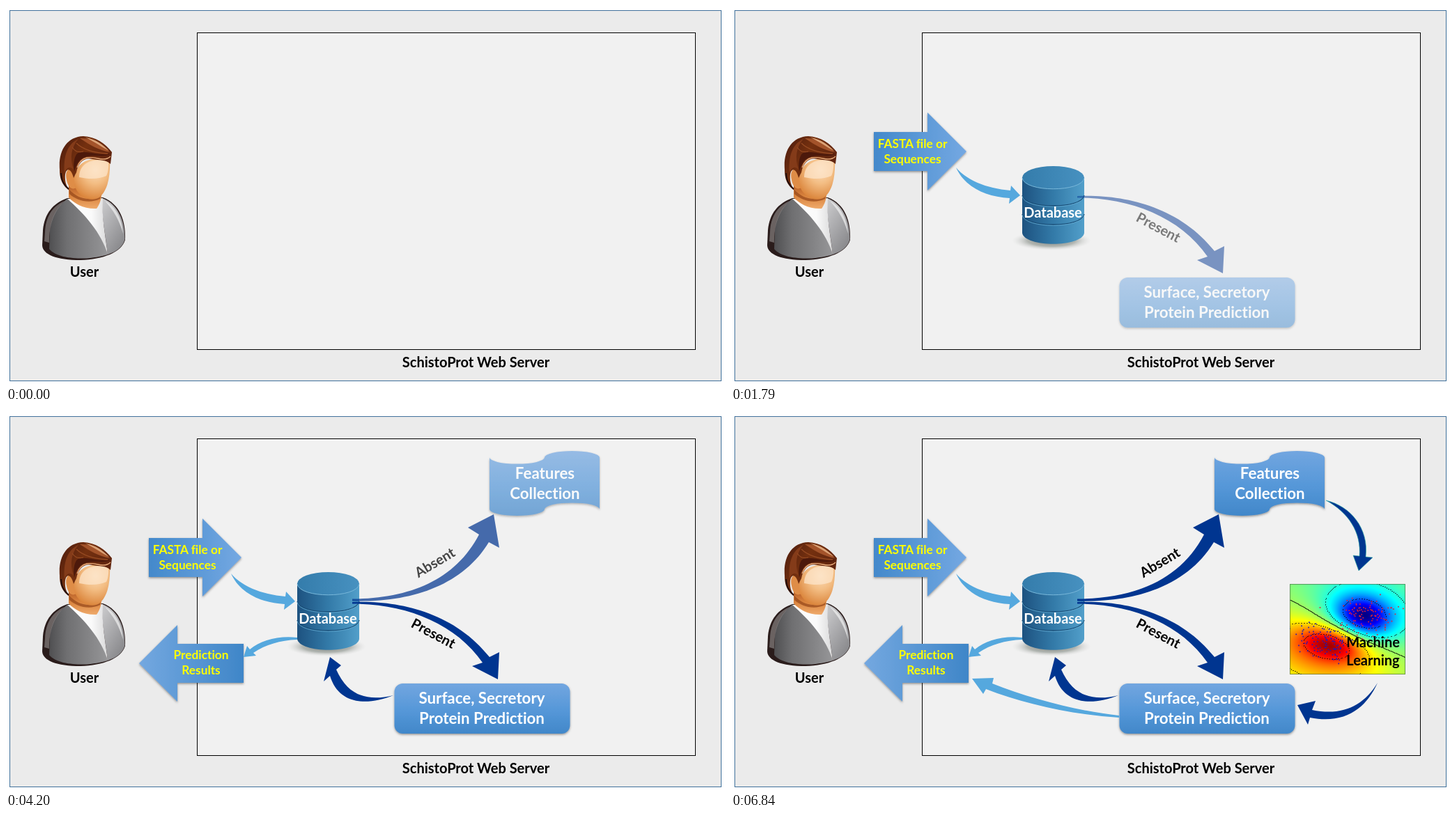
Write an HTML page with a canvas that moves like this. It is 1032 px wide and 543 px high and loops after 7.14 s.

```html
<!DOCTYPE html>
<html lang="en">
<head>
<meta charset="utf-8">
<title>Web server workflow</title>
<style>
html, body { margin: 0; width: 100%; height: 100%; overflow: hidden; background: #fff; }
svg, canvas, #ml { position: absolute; left: 0; top: 0; display: block; }
#ml { left: 802px; top: 247px; width: 166px; height: 130px; }
text { font-family: Lato, Carlito, Calibri, sans-serif; font-weight: 700; font-size: 20px; text-anchor: middle; font-variant-ligatures: none; }
.step { opacity: 0; }
.navy { fill: #003590; }
.sky { fill: #55a8de; }
.yellow { fill: #ff0; font-size: 17.3px; }
.white { fill: #fff; }
.big { font-size: 22.3px; }
</style>
</head>
<body>
<svg width="1032" height="543" viewBox="0 0 1032 543">
  <defs>
    <linearGradient id="right"><stop stop-color="#4389cb"/><stop offset="1" stop-color="#74a8e2"/></linearGradient>
    <linearGradient id="left"><stop stop-color="#74a8e0"/><stop offset="1" stop-color="#3f86c8"/></linearGradient>
    <linearGradient id="down" x2="0" y2="1"><stop stop-color="#72a6e0"/><stop offset=".55" stop-color="#5597d8"/><stop offset="1" stop-color="#4187c9"/></linearGradient>
    <linearGradient id="drum"><stop stop-color="#1d5280"/><stop offset=".5" stop-color="#337aa8"/><stop offset="1" stop-color="#529fca"/></linearGradient>
    <linearGradient id="lid"><stop stop-color="#347cab"/><stop offset="1" stop-color="#4791c0"/></linearGradient>
    <linearGradient id="coat"><stop stop-color="#4f4f51"/><stop offset=".3" stop-color="#6f6f71"/><stop offset="1" stop-color="#969698"/></linearGradient>
    <linearGradient id="coat2" x2=".6" y2="1"><stop stop-color="#cdcdcf"/><stop offset="1" stop-color="#8a8a8d"/></linearGradient>
    <linearGradient id="shirt"><stop stop-color="#fff"/><stop offset=".6" stop-color="#fafafa"/><stop offset="1" stop-color="#d9d9da"/></linearGradient>
    <linearGradient id="hair" x2="1" y2=".6"><stop stop-color="#4a1a0d"/><stop offset=".45" stop-color="#74300f"/><stop offset="1" stop-color="#5b220f"/></linearGradient>
    <linearGradient id="neck" x2="0" y2="1"><stop stop-color="#b8602a"/><stop offset=".45" stop-color="#d9833d"/><stop offset="1" stop-color="#efaa6b"/></linearGradient>
    <radialGradient id="face" cx=".6" cy=".28" r=".75"><stop stop-color="#fbdcb8"/><stop offset=".45" stop-color="#f3bd83"/><stop offset="1" stop-color="#da8339"/></radialGradient>
    <radialGradient id="ground"><stop stop-color="#777c78"/><stop offset=".6" stop-color="#a5aaa5" stop-opacity=".85"/><stop offset="1" stop-color="#ddd" stop-opacity="0"/></radialGradient>
    <filter id="soft" x="-10%" y="-10%" width="120%" height="130%"><feDropShadow dx="0" dy="1.5" stdDeviation="1.4" flood-color="#333" flood-opacity=".5"/></filter>
  </defs>

  <rect x="5.5" y="6.5" width="1021" height="532" fill="#ebebeb" stroke="#41719c"/>
  <rect x="274.5" y="38.5" width="715" height="455" fill="#f1f1f1" stroke="#000"/>
  <text x="674.5" y="519" font-size="20.2">SchistoProt Web Server</text>

  <g id="user">
    <path d="M88 276C68 283 55 298 53 322L52 344C53 357 72 365 107 365C139 364 166 354 171 336C172 308 163 284 139 275Z" fill="#2a1c1b"/>
    <path d="M88 277C74 287 65 302 63 322L62 349C72 361 95 363 116 362.500C130 361 140 359 146 357C138 326 116 299 88 277Z" fill="url(#coat)"/>
    <path d="M84 280C66 288 57 303 56 325L55 338L62 340C62 315 68 296 84 280Z" fill="#8d8888" opacity=".65"/>
    <path d="M138 276C160 284 171 308 170.500 335C168 346 158 353 146 357C143 328 137 304 138 276Z" fill="url(#coat2)"/>
    <path d="M142 280C157 287 167 306 168 327C163 308 154 293 142 280Z" fill="#eee" opacity=".75"/>
    <path d="M88 277L139 276C137 304 143 330 146 357C137 326 113 299 88 277Z" fill="url(#shirt)"/>
    <path d="M90 258V275C98 284 112 292 130 291C133 287 136 281 137 272Z" fill="url(#neck)"/>
    <path d="M91 264C102 276 120 282 136 272L135 277C119 285 101 279 91 270Z" fill="#954719" opacity=".7"/>
    <path d="M98 236C89 230 84 239 87 250C89 260 94 265 101 261Z" fill="#df8d47"/>
    <path d="M99 244C102 226 116 216 149 220C150 242 147 264 134 275C122 282 106 275 100 262C97 256 97 250 99 244Z" fill="url(#face)"/>
    <path d="M105 246C105 227 121 218 147 222C148 232 146 240 144 244C133 249 119 249 105 246Z" fill="#fee7cc" opacity=".72"/>
    <path d="M77 235C75 208 87 188 111 187C129 188 142 197 152 210L150 227C143 220 134 222 124 220C112 217 104 225 101 239L97 247C94 234 87 231 85 242C84 253 87 259 91 265C81 258 77 249 77 235Z" fill="url(#hair)"/>
    <path d="M84 240C82 216 88 198 104 191C94 202 91 218 97 235C92 230 87 231 84 240Z" fill="#843b19"/>
    <path d="M102 212C112 205 135 217 150 212C142 219 125 212 111 218C104 221 100 230 98 238C96 226 98 217 102 212Z" fill="#4c190b"/>
    <path d="M106 190C123 189 139 200 149 210C133 207 121 200 106 190Z" fill="#a3532a"/>
    <path d="M114 189C129 191 140 200 148 208C138 203 129 196 114 189Z" fill="#dca276"/>
    <path d="M101 197C111 207 128 211 146 212M95 203C99 209 104 211 111 209" fill="none" stroke="#964a22" stroke-width="1.300"/>
    <path d="M102 232C108 214 123 217 132 219C140 221 146 220 150 216" fill="none" stroke="#e9ac7b" stroke-width="1.300"/>
    <path d="M79 240C79 250 84 258 90 263" fill="none" stroke="#210d0b" stroke-width="2"/>
    <text x="112.5" y="389">User</text>
  </g>

  <g class="step" data-step="0">
    <path d="M205 181H282V153L338 209L282 265V237H205Z" fill="url(#right)" filter="url(#soft)"/>
    <text class="yellow" x="260.5" y="203.5">FASTA file or</text>
    <text class="yellow" x="260.5" y="226">Sequences</text>
    <path class="sky" d="M323 232C338 250 366 262 401 265L402 258L415 272L399 284L400 276C364 274 335 259 323 232Z"/>
    <ellipse cx="460" cy="337" rx="57" ry="14" fill="url(#ground)"/>
    <path d="M418 246V326C421 347 504 347 507 326V246Z" fill="url(#drum)"/>
    <ellipse cx="462.5" cy="246.5" rx="44.5" ry="16.5" fill="url(#lid)"/>
    <g fill="none">
      <path d="M418 247C421 268 504 268 507 247" stroke="#79b8da"/>
      <path id="seams" d="M418 272C421 292 504 292 507 272M418 299C421 319 504 319 507 299" stroke="#174a73" stroke-width="1.3"/>
      <path d="M418 273.3C421 293.3 504 293.3 507 273.3M418 300.3C421 320.3 504 320.3 507 300.3" stroke="#5fa6cf" stroke-width=".9"/>
    </g>
    <text class="white" x="462" y="303.5">Database</text>
  </g>

  <g class="step" data-step="1">
    <path class="navy" d="M497 273C560 270 642 286 694 352L708 345L706 384L669 365L684 360C645 303 572 275 497 275.5Z"/>
    <text transform="translate(613 319) rotate(28)" y="6">Present</text>
    <rect x="557.5" y="390" width="252" height="72" rx="12" fill="url(#down)" filter="url(#soft)"/>
    <text class="white big" x="683" y="419">Surface, Secretory</text>
    <text class="white big" x="683" y="448">Protein Prediction</text>
  </g>

  <path class="step navy" data-step="2" d="M556 407C523 415 492 411 474 370L481 364L465 352L456 387L465 379C478 421 518 422 556 407Z"/>

  <g class="step" data-step="3">
    <path d="M341 333H246V306L191 361L246 416V389H341Z" fill="url(#left)" filter="url(#soft)"/>
    <text class="yellow" x="280" y="355">Prediction</text>
    <text class="yellow" x="280" y="377">Results</text>
    <path class="sky" d="M418 324C390 321 366 328 350 341L346 336L341 352L359 350L355 346C373 334 393 328 418 327Z"/>
  </g>

  <g class="step" data-step="4">
    <path class="navy" d="M497 268.5C580 268 645 241 679 176L663 166L700 147L708 195L693 187C655 250 580 274 497 271.5Z"/>
    <text transform="translate(616 217) rotate(-31)" y="6">Absent</text>
    <path d="M694 65.3A39.5 9.3 0 0 0 773 65.3A39.5 9.3 0 0 1 852 65.3V139.7A39.5 9.3 0 0 0 773 139.7A39.5 9.3 0 0 1 694 139.7Z" fill="url(#down)" filter="url(#soft)"/>
    <text class="white big" x="773.5" y="96">Features</text>
    <text class="white big" x="773.5" y="125">Collection</text>
  </g>

  <path class="step navy" data-step="5" stroke="#35b3a6" stroke-width=".6" d="M854 127C889 135 916 167 911 208L921 209L901 228L893 206L902 207C905 173 886 144 854 127Z"/>
  <path class="step navy" data-step="6" d="M928 389C908 422 878 437 834 428L839 415L813 421L828 449L831 439C882 449 912 425 928 389Z"/>
  <path class="step sky" data-step="7" d="M557 436C500 430 430 412 375 390L377 382L346 383L362 405L366 398C420 419 490 435 557 439Z"/>
</svg>

<div id="ml" class="step" data-step="5">
  <canvas id="field" width="166" height="130"></canvas>
  <svg width="166" height="130">
    <text x="119.5" y="90.5">Machine</text>
    <text x="119.5" y="117">Learning</text>
  </svg>
</div>

<script>
const LOOP = 7140;
// start, end, number of opacity levels, optional length of the first level
const FADES = [
  [850, 1250, 6], [1560, 2090, 8], [2400, 2860, 7], [3090, 3560, 7],
  [3880, 4350, 7], [4650, 5110, 7], [5640, 6120, 7, 100], [6440, 6840, 6]
];
const parts = [...document.querySelectorAll('.step')];

function level(t, [start, end, n, first]) {
  if (t < start) return 0;
  if (t >= end) return 1;
  const hold = first || (end - start) / (n - 1);
  if (t < start + hold - 8) return 1 / n;
  const rest = (end - start - hold) / (n - 2);
  return Math.min(n, 2 + Math.floor((t - start - hold) / rest + 0.1)) / n;
}

function render(now) {
  const t = now % LOOP;
  for (const part of parts) part.style.opacity = level(t, FADES[part.dataset.step]);
}

function drawField() {
  const ctx = document.getElementById('field').getContext('2d');
  const W = 166, H = 130, tilt = 0.22;
  const cos = Math.cos(tilt), sin = Math.sin(tilt);
  const bell = (x, y, cx, cy, sx, sy) => {
    const dx = x - cx, dy = y - cy;
    const u = (dx * cos + dy * sin) / sx, v = (dy * cos - dx * sin) / sy;
    return Math.exp(-(u * u + v * v) / 2);
  };
  const score = (x, y) =>
    0.55 * bell(x, y, 60, 86, 32, 16) + 0.5 * bell(x, y, 44, 98, 72, 38) -
    0.72 * bell(x, y, 105, 46, 27, 18) - 0.38 * bell(x, y, 108, 42, 54, 38);
  const jet = (v, peak) => 255 * Math.max(0, Math.min(1, 1.5 - Math.abs(4 * v - peak)));

  // contour lines: solid where the score is near zero, dashed elsewhere
  const levels = [-0.6, -0.2, 0.04, 0.3, 0.65];
  const band = s => levels.filter(l => s > l).length;
  const onLine = (x, y, s) => {
    const b = band(s), c = band(score(x + 1, y)), d = band(score(x, y + 1));
    if (b === c && b === d) return false;
    return Math.abs(s) < 0.1 || (x + y) % 4 < 2;
  };

  const img = ctx.createImageData(W, H);
  for (let y = 0, i = 0; y < H; y++) for (let x = 0; x < W; x++) {
    const s = score(x, y), shade = onLine(x, y, s) ? 0.35 : 1;
    for (const peak of [3, 2, 1]) img.data[i++] = shade * jet(0.51 + 0.5 * s, peak);
    img.data[i++] = 255;
  }
  ctx.putImageData(img, 0, 0);

  let seed = 11;
  const rand = () => (seed = seed * 16807 % 2147483647) / 2147483647;
  const spread = () => (rand() + rand() + rand() - 1.5) * 1.9;
  const dots = (n, color, cx, cy, sx, sy) => {
    ctx.fillStyle = color;
    for (let i = 0; i < n; i++) {
      const u = spread() * sx, v = spread() * sy;
      ctx.fillRect(cx + u * cos - v * sin, cy + u * sin + v * cos, 1.7, 1.7);
    }
  };
  dots(110, '#e2203a', 108, 43, 24, 15);
  dots(120, '#2418b8', 52, 85, 27, 13);

  ctx.strokeStyle = 'rgba(60,90,60,.6)';
  ctx.strokeRect(0.5, 0.5, W - 1, H - 1);
}

function frame() {
  render(performance.now());
  requestAnimationFrame(frame);
}

drawField();
frame();
</script>
</body>
</html>
```
